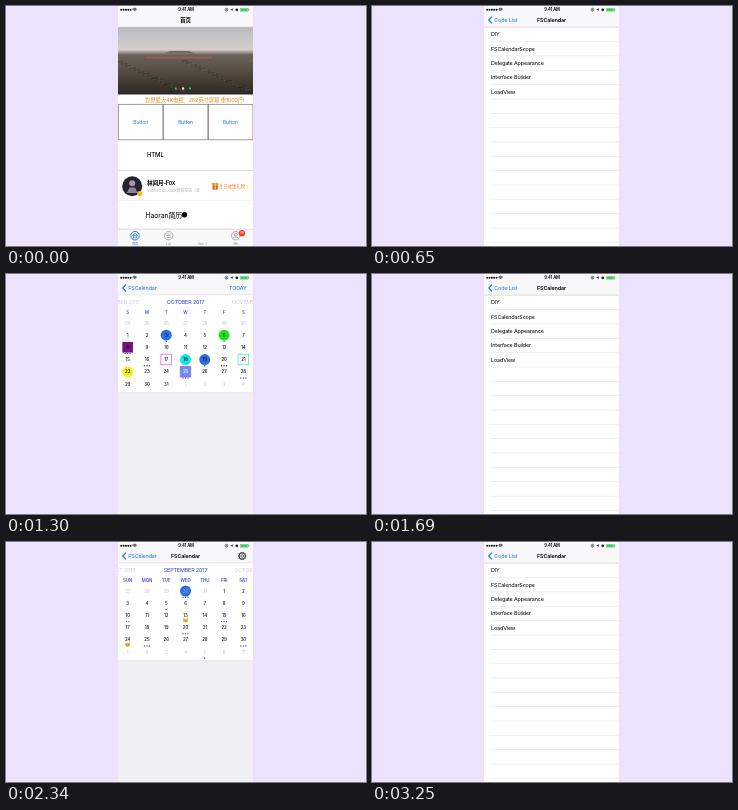
Recreate the animation shown at these times as an HTML page with a canvas. Size 360 by 240 pixels, loop 3.38 s.

```html
<!DOCTYPE html>
<html lang="en">
<head>
<meta charset="utf-8">
<title>Calendar app tour</title>
<style>
html, body { margin: 0; width: 100%; height: 100%; overflow: hidden; background: #ece2fe; }
canvas { display: block; width: 360px; height: 240px; }
</style>
</head>
<body>
<canvas id="stage"></canvas>
<script>
const canvas = document.getElementById('stage');
const ctx = canvas.getContext('2d');
const ratio = window.devicePixelRatio || 1;
canvas.width = 360 * ratio;
canvas.height = 240 * ratio;

const LEFT = 112, RIGHT = 247, MID = 179.5, WIDTH = RIGHT - LEFT;
const ROW = 14.35;
const BLUE = '#1677f2', INDIGO = '#2b3fd0', GROUP = '#efeff4', LINE = '#e0dfe4', DOT = '#3650c8';
const FONT = 'Inter, "Noto Sans CJK SC", "Noto Sans CJK", sans-serif';

function rect(x, y, w, h, color) {
  ctx.fillStyle = color;
  ctx.fillRect(x, y, w, h);
}

function frame(x, y, w, h, color, weight = 0.7) {
  ctx.strokeStyle = color;
  ctx.lineWidth = weight;
  ctx.strokeRect(x, y, w, h);
}

function ellipse(x, y, rx, ry, color) {
  ctx.fillStyle = color;
  ctx.beginPath();
  ctx.ellipse(x, y, rx, ry, 0, 0, Math.PI * 2);
  ctx.fill();
}

const disc = (x, y, r, color) => ellipse(x, y, r, r, color);

function ring(x, y, r, color, weight = 0.7, from = 0, to = Math.PI * 2) {
  ctx.strokeStyle = color;
  ctx.lineWidth = weight;
  ctx.beginPath();
  ctx.arc(x, y, r, from, to);
  ctx.stroke();
}

function path(points, color, weight) {
  ctx.beginPath();
  points.forEach(([x, y]) => ctx.lineTo(x, y));
  if (weight) {
    ctx.strokeStyle = color;
    ctx.lineWidth = weight;
    ctx.stroke();
  } else {
    ctx.fillStyle = color;
    ctx.fill();
  }
}

function text(str, x, y, { size = 5.4, color = '#000', align = 'left', weight = 400 } = {}) {
  ctx.font = `${weight} ${size}px ${FONT}`;
  ctx.letterSpacing = `${-0.024 * size}px`;
  ctx.textAlign = align;
  ctx.textBaseline = 'alphabetic';
  ctx.fillStyle = color;
  ctx.fillText(str, x, y + size * 0.36);
}

const centered = (str, x, y, style) => text(str, x, y, { align: 'center', ...style });

function cat(x, y, s = 1) {
  path([[x - 3 * s, y], [x - 2.7 * s, y - 3 * s], [x - s, y - 1.6 * s], [x + s, y - 1.6 * s],
    [x + 2.7 * s, y - 3 * s], [x + 3 * s, y]], '#e9a72d');
  ellipse(x, y + 0.3 * s, 3.1 * s, 2.3 * s, '#f5bd3d');
  disc(x - 1.2 * s, y - 0.1 * s, 0.5 * s, '#4c3420');
  disc(x + 1.2 * s, y - 0.1 * s, 0.5 * s, '#4c3420');
  disc(x, y + 1.2 * s, 0.5 * s, '#8d4b35');
}

function dots(x, y, count, color = DOT) {
  for (let i = 0; i < count; i++) disc(x + (i - (count - 1) / 2) * 2.5, y, 0.7, color);
}

function statusBar() {
  for (let i = 0; i < 5; i++) disc(115.2 + i * 2.35, 3.7, 0.95, '#000');
  for (const r of [1, 2, 3]) ring(128.6, 5.4, r, '#000', 0.7, -2.4, -0.74);
  centered('9:41 AM', 180, 3.8, { size: 4.2, weight: 600 });
  ring(220.5, 3.7, 1.4, '#222', 0.6);
  disc(220.5, 3.8, 0.6, '#222');
  path([[224.2, 4], [227.3, 2.2], [226, 5.4], [225.7, 4]], '#222');
  disc(230.8, 3.8, 1.4, '#222');
  frame(234.2, 2.2, 8, 3.1, '#63a66b', 0.4);
  rect(234.7, 2.6, 7, 2.3, '#2ed158');
  rect(242.6, 3.1, 0.6, 1.3, '#555');
}

function navBar(title, back, right, backColor = BLUE) {
  rect(LEFT, 0, WIDTH, 21, '#f8f8fa');
  rect(LEFT, 20.8, WIDTH, 0.5, '#b9b9bd');
  statusBar();
  centered(title, MID, 14, { weight: 600 });
  if (back) {
    path([[120, 10.7], [116.8, 14], [120, 17.3]], backColor, 1.2);
    text(back, 122.3, 14, { color: backColor });
  }
  if (right) text(right, 240.5, 14, { color: BLUE, align: 'right' });
}

const columnX = i => LEFT + WIDTH / 14 * (2 * i + 1);
const rowY = i => 49 + i * 12.2;

/* `first` is the cell index of day 1; `previous` the length of the month before. */
function calendar({ months, days, first, length, previous, back = '#fff', white = [], under, over }) {
  rect(LEFT, 21.2, WIDTH, 97.6, back);
  rect(LEFT, 118.5, WIDTH, 0.5, '#dadade');
  months.forEach((name, i) => centered(name, MID + (i - 1) * 67.5, 28.5,
    { size: 5.4, color: i === 1 ? INDIGO : '#cfcfda' }));
  days.forEach((name, i) => centered(name, columnX(i), 38.5, { size: 4.4, color: INDIGO, weight: 500 }));

  const at = cell => [columnX(cell % 7), rowY(Math.floor(cell / 7))];
  const place = day => at(first + day - 1);
  if (under) under(place);
  for (let cell = 0; cell < 42; cell++) {
    const day = cell - first + 1;
    const inside = day > 0 && day <= length;
    const label = inside ? day : day < 1 ? previous + day : day - length;
    const [x, y] = at(cell);
    const color = white.includes(day) ? '#fff' : inside ? '#111' : '#b9b9bf';
    centered(String(label), x, y, { size: 4.4, color, weight: inside ? 500 : 400 });
  }
  if (over) over(place);
}

const WEEKDAYS = ['Sun', 'Mon', 'Tue', 'Wed', 'Thu', 'Fri', 'Sat'];

function photo() {
  const shade = ctx.createLinearGradient(0, 21, 0, 89);
  [[0, '#b9b9be'], [0.2, '#c9c6c8'], [0.33, '#d6cdca'], [0.37, '#a39a95'], [0.41, '#6b625a'],
    [0.6, '#5b5148'], [0.8, '#443c34'], [1, '#2b2722']].forEach(([p, c]) => shade.addColorStop(p, c));
  rect(LEFT, 21.2, WIDTH, 67.3, shade);
  path([[158, 47.5], [164, 45], [183, 45], [189, 47.5]], '#766a65');
  rect(140, 50.5, 66, 2, '#87625a');
  for (let i = 0; i < 70; i++) {
    const x = LEFT + i * 37 % 135;
    const y = 55 + i * 17 % 31;
    ellipse(x, y, 3.5, 1.2, i % 2 ? 'rgba(30,28,24,.28)' : 'rgba(140,124,104,.2)');
  }
  disc(169.8, 82.5, 1, '#48d04c');
  disc(177, 82.5, 1.2, '#fff');
  disc(184, 82.5, 1, '#48d04c');
}

function tabBar() {
  rect(LEFT, 223, WIDTH, 17, '#f8f8f8');
  rect(LEFT, 222.8, WIDTH, 0.5, '#bebec2');
  const gray = '#929297';
  ring(129, 229.7, 4.3, BLUE, 0.9);
  path([[126.2, 229.8], [129, 227.2], [131.8, 229.8]], BLUE, 0.8);
  frame(127.4, 229.6, 3.2, 2.3, BLUE, 0.7);
  ring(162.7, 229.7, 4.2, gray);
  for (const y of [228, 229.7, 231.4]) rect(160.7, y - 0.3, 4, 0.6, gray);
  ring(229.7, 229.7, 4.2, gray);
  ring(229.7, 228.5, 1.4, gray);
  path([[227, 232.4], [228.2, 231], [231.2, 231], [232.4, 232.4]], gray, 0.7);
  disc(236, 227.2, 3.1, '#f13b30');
  centered('99', 236, 227.2, { size: 3.1, color: '#fff' });
  ['首页', 'List', 'Item 1', 'Me'].forEach((label, i) =>
    centered(label, 129 + i * 33.6, 237.4, { size: 3.2, color: i ? gray : BLUE }));
}

function home() {
  navBar('首页');
  photo();
  text('世界最大4K电视：262英寸屏幕 重1600斤!', 139, 93.6, { size: 5.4, color: '#f08a1d' });
  for (let i = 0; i < 3; i++) {
    frame(LEFT + 0.4 + i * 45, 98.3, 44.5, 35.5, '#777', 0.7);
    centered('Button', 134.7 + i * 44.8, 116.3, { size: 5, color: BLUE });
  }
  text('HTML', 141, 149.2, { size: 6, weight: 500 });
  rect(LEFT, 164, WIDTH, 1, '#dededf');
  disc(126.2, 180.2, 10, '#252235');
  disc(126.2, 177.2, 3, '#a798a4');
  path([[120.8, 187], [123.5, 181.5], [129, 181.5], [131.8, 187]], '#8f8293');
  disc(133.8, 187.6, 2.6, '#f5bd24');
  text('林间月-Fox', 141, 177, { size: 5.6, weight: 600 });
  text('Verified account微名意达（北..', 141, 185, { size: 4, color: '#b0b0b4' });
  rect(205.8, 177, 6.6, 2.1, '#f29a23');
  rect(206.5, 179.2, 5.3, 4.5, '#dc6429');
  rect(208.7, 176.4, 1, 7.3, '#ffd35b');
  text('生日收集礼物 〉', 213.2, 180.3, { size: 4.4, color: '#f08a1d' });
  rect(LEFT, 194.5, WIDTH, 0.5, '#ececef');
  text('Haoran简历', 139.5, 209, { size: 7 });
  disc(178.5, 208.7, 2.7, '#000');
  tabBar();
}

function list() {
  navBar('FSCalendar', 'Code List');
  ['DIY', 'FSCalendarScope', 'Delegate Appearance', 'Interface Builder', 'LoadView']
    .forEach((name, i) => text(name, 119, 28.3 + i * ROW));
  for (let y = 35.3; y < 240; y += ROW) rect(119, y, 128, 0.5, LINE);
}

function capsule(x, y, w, h, radii) {
  ctx.fillStyle = '#000';
  ctx.beginPath();
  ctx.roundRect(x, y, w, h, radii);
  ctx.fill();
}

function diy() {
  rect(LEFT, 21, WIDTH, 219, GROUP);
  navBar('FSCalendar', 'FSCalendar');
  const white = [14, 17, 18, 19, 20];
  calendar({
    months: ['May 2017', 'June 2017', 'July 2017'], days: WEEKDAYS,
    first: 4, length: 30, previous: 31, back: '#f2f1f6', white,
    under() {
      disc(MID, 74.3, 6.2, '#000');
      capsule(227.5, 68.2, 19.5, 12.2, [6, 0, 0, 6]);
      capsule(LEFT, 80.4, 57.8, 12.2, [0, 6, 6, 0]);
    },
    over(place) {
      for (let day = 1; day <= 30; day++) {
        const [x, y] = place(day);
        dots(x, y + 3.9, 2, white.includes(day) ? '#fff' : '#4b55a5');
      }
    }
  });
  cat(158.5, 130);
  cat(200, 130);
  centered('Hey Daily Event', MID, 130.2, { size: 4.6 });
}

function scope() {
  rect(LEFT, 21, WIDTH, 219, GROUP);
  navBar('FSCalendar', 'FSCalendar', 'Toggle');
  calendar({
    months: ['June 2017', 'July 2017', 'August 2017'], days: WEEKDAYS,
    first: 6, length: 31, previous: 30
  });
  cells(127.2, ['FSCalendarScopeMonth', 'FSCalendarScopeWeek']);
  rect(LEFT, 162.8, WIDTH, 78, '#fff');
  rect(LEFT, 162.6, WIDTH, 0.5, LINE);
  for (let i = 0; i < 6; i++) {
    const y = 169.8 + i * 14.2;
    cat(122, y);
    text('Lorem ipsum dolor sit er elit lamet', 130, y);
    rect(119, y + 7, 128, 0.5, LINE);
  }
  rect(242.2, 163, 0.4, 77, '#e2e2e6');
}

function appearance() {
  rect(LEFT, 21, WIDTH, 219, GROUP);
  navBar('', 'FSCalendar', 'TODAY');
  const circles = { 3: '#2a6fe0', 6: '#18e614', 18: '#15e4e8', 19: '#2a6fe0', 22: '#f8f016' };
  const box = ([x, y], draw, ...style) => draw(x - 5.3, y - 5.4, 10.6, 10.6, ...style);
  calendar({
    months: ['SEPTEMBER 2017', 'OCTOBER 2017', 'NOVEMBER 2017'],
    days: ['S', 'M', 'T', 'W', 'T', 'F', 'S'],
    first: 7, length: 31, previous: 30, white: [25],
    under(place) {
      for (const day in circles) disc(...place(+day), 5.5, circles[day]);
      box(place(8), rect, '#79107f');
      box(place(25), rect, '#6b8cec');
      box(place(25), frame, '#9a62d8');
      box(place(17), frame, '#e64be3');
      box(place(21), frame, '#35dfe5');
    },
    over(place) {
      [[3, 1, DOT], [6, 1, DOT], [8, 3, '#333'], [16, 3, '#633'], [19, 1, DOT],
        [20, 3, '#333'], [25, 3, DOT], [28, 3, DOT]].forEach(([day, count, color]) => {
        const [x, y] = place(day);
        dots(x, y + 6.2, count, color);
      });
    }
  });
}

function builder() {
  rect(LEFT, 21, WIDTH, 219, GROUP);
  navBar('FSCalendar', 'FSCalendar');
  ring(236.2, 14, 3.2, '#222', 1);
  ring(236.2, 14, 1.4, '#222', 0.7);
  for (let i = 0; i < 10; i++) {
    const a = i * Math.PI / 5;
    disc(236.2 + 3.7 * Math.cos(a), 14 + 3.7 * Math.sin(a), 0.5, '#222');
  }
  calendar({
    months: ['AUGUST 2017', 'SEPTEMBER 2017', 'OCTOBER 2017'],
    days: WEEKDAYS.map(name => name.toUpperCase()),
    first: 5, length: 30, previous: 31,
    under: place => disc(...place(-1), 5.5, '#2a6fe0'),
    over(place) {
      [[-1, 3], [5, 1], [10, 2], [15, 3], [20, 3], [25, 3], [30, 3], [35, 1]].forEach(([day, count]) => {
        const [x, y] = place(day);
        dots(x, y + 6.2, count);
      });
      for (const day of [13, 24]) {
        const [x, y] = place(day);
        cat(x, y + 5, 0.85);
      }
    }
  });
}

function cells(top, names, checked) {
  rect(LEFT, top, WIDTH, names.length * ROW, '#fff');
  rect(LEFT, top - 0.2, WIDTH, 0.5, LINE);
  names.forEach((name, i) => {
    const y = top + (i + 0.5) * ROW;
    const last = i === names.length - 1;
    text(name, 119, y);
    rect(last ? LEFT : 119, y + ROW / 2 - 0.3, last ? WIDTH : 128, 0.5, LINE);
    if (i === checked) path([[235.7, y], [237.1, y + 1.5], [239.9, y - 1.6]], BLUE, 0.9);
  });
}

function picker() {
  rect(LEFT, 163.8, WIDTH, 53, '#fff');
  const months = ['July', 'August', 'September', 'October', 'November'];
  const offsets = [-18.6, -10, 0, 10.3, 19];
  ctx.save();
  ctx.beginPath();
  ctx.rect(LEFT, 167.5, WIDTH, 42.2);
  ctx.clip();
  months.forEach((month, i) => {
    const far = Math.abs(i - 2);
    const style = { size: [7.5, 6.9, 6.2][far], color: ['#000', '#a4a4a7', '#cbcbce'][far] };
    ctx.save();
    ctx.translate(0, 190 + offsets[i]);
    ctx.scale(1, [1, 0.95, 0.7][far]);
    text(String(16 + i), 145, 0, { ...style, align: 'right' });
    text(month, 156, 0, style);
    text(String(2015 + i), 203, 0, style);
    ctx.restore();
  });
  ctx.restore();
  rect(LEFT, 184.5, WIDTH, 0.5, LINE);
  rect(LEFT, 195.7, WIDTH, 0.5, LINE);
}

function configuration() {
  rect(LEFT, 21, WIDTH, 219, GROUP);
  navBar('Configuration', 'FSCalendar', '', '#bddafa');
  [['THEME', 33.2], ['SUBTITLE', 89.5], ['SCROLL DIRECTION', 117.2], ['SELECT A DATE', 159.4],
    ['FIRST WEEKDAY', 239.8]].forEach(([label, y]) => text(label, 119, y, { size: 4, color: '#77777d' }));
  cells(37.4, ['Theme1', 'Theme2', 'Theme3'], 2);
  cells(93.6, ['Lunar']);
  cells(121.4, ['Horizontal', 'Vertical'], 0);
  picker();
  cells(216.6, ['Click to select']);
}

const STEP = 130, LOOP = 3380;
const tour = [
  [0, home], [1, list], [3, diy], [5, list], [6, scope], [9, list], [10, appearance],
  [13, list], [14, builder], [20, configuration], [23, builder], [24, list]
];

function draw(now) {
  const step = Math.floor((now % LOOP) / STEP);
  const screen = tour.filter(([start]) => start <= step).pop()[1];
  ctx.setTransform(ratio, 0, 0, ratio, 0, 0);
  rect(0, 0, 360, 240, '#ece2fe');
  ctx.save();
  ctx.beginPath();
  ctx.rect(LEFT, 0, WIDTH, 240);
  ctx.clip();
  rect(LEFT, 0, WIDTH, 240, '#fff');
  screen();
  ctx.restore();
}

const start = performance.now();
function tick() {
  draw(performance.now() - start);
  requestAnimationFrame(tick);
}
tick();
</script>
</body>
</html>
```
